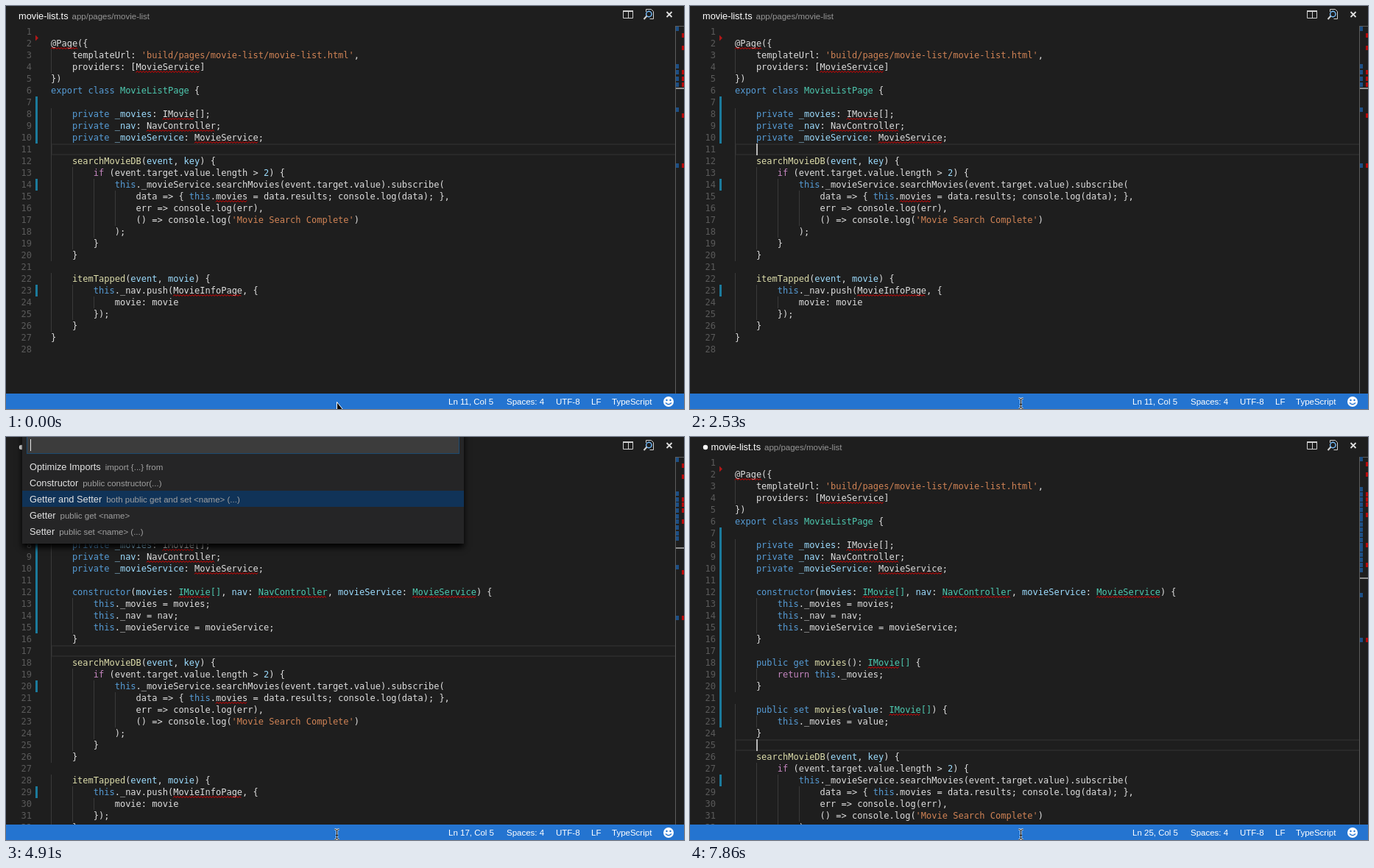
An HTML page with a canvas for the animation above (8 s loop, 921 by 548 pixels).

```html
<!DOCTYPE html>
<html lang="en">
<head>
<meta charset="utf-8">
<title>Code generation in an editor</title>
<style>
html, body { margin: 0; width: 100%; height: 100%; overflow: hidden; background: #1e1e1e; }
canvas { display: block; }
</style>
</head>
<body>
<canvas id="stage" width="921" height="548"></canvas>
<script>
const ctx = document.getElementById('stage').getContext('2d');
const LOOP = 8000, TOP = 27, BOTTOM = 527, LINE = 16, CODE_X = 61, CHAR = 7.224;
const CODE_FONT = '12px "DejaVu Sans Mono", monospace';
const UI_FONT = '12.8px "Liberation Sans", Arial, sans-serif';
const SMALL_FONT = '11.5px "Liberation Sans", Arial, sans-serif';

const head = `
@Page({
    templateUrl: 'build/pages/movie-list/movie-list.html',
    providers: [MovieService]
})
export class MovieListPage {

    private _movies: IMovie[];
    private _nav: NavController;
    private _movieService: MovieService;
    `;
const constructorCode = `
    constructor(movies: IMovie[], nav: NavController, movieService: MovieService) {
        this._movies = movies;
        this._nav = nav;
        this._movieService = movieService;
    }
    `;
const accessorCode = `
    public get movies(): IMovie[] {
        return this._movies;
    }

    public set movies(value: IMovie[]) {
        this._movies = value;
    }
    `;
const tail = `
    searchMovieDB(event, key) {
        if (event.target.value.length > 2) {
            this._movieService.searchMovies(event.target.value).subscribe(
                data => { this.movies = data.results; console.log(data); },
                err => console.log(err),
                () => console.log('Movie Search Complete')
            );
        }
    }

    itemTapped(event, movie) {
        this._nav.push(MovieInfoPage, {
            movie: movie
        });
    }
}
`;

const tokenRule = new RegExp([
  /(?<string>'[^']*')/,
  /(?<keyword>\b(?:export|class|private|public|get|set|constructor|this)\b)/,
  /(?<control>\b(?:if|return)\b)/,
  /(?<type>(?<=class )\w+|(?<=: )[A-Z]\w+(?:\[\])?(?=,|\)| \{))/,
  /(?<method>(?<=^ {4}|[gs]et )\w+(?=\())/,
  /(?<variable>(?<=private )\w+|(?<=^ {4}[\w ]+\(.*)\b\w+(?=[:,)]))/
].map(r => r.source).join('|'), 'g');
const colors = {
  string: '#d08355', keyword: '#569cd6', control: '#c586c0',
  type: '#4ec9b0', method: '#dcdcaa', variable: '#9cdcfe'
};

function makeDoc(text, cursor, lastChanged, errorRule) {
  const lines = text.split('\n');
  const changed = [cursor + 3, cursor + 12];
  for (let n = 7; n <= lastChanged; n++) changed.push(n);
  return { lines, cursor, changed, errors: lines.map(line => [...line.matchAll(errorRule)]) };
}
const errorNames = '@Page|\\b(?:IMovie|NavController|MovieService|MovieInfoPage)\\b';
const allErrors = new RegExp(errorNames + '|(?<=this\\.)movies', 'g');
const docs = [
  makeDoc(head + tail, 11, 10, allErrors),
  makeDoc(head + constructorCode + tail, 17, 15, allErrors),
  makeDoc(head + constructorCode + accessorCode + tail, 25, 23, new RegExp(errorNames, 'g'))
];

const actions = { row: 22, items: [
  ['Optimize Imports', 'import {...} from'],
  ['Constructor', 'public constructor(...)'],
  ['Getter and Setter', 'both public get and set <name> (...)'],
  ['Getter', 'public get <name>'],
  ['Setter', 'public set <name> (...)']
] };
const fields = { row: 44, items: [
  ['_movies', 'MovieListPage', 'IMovie[]'],
  ['_nav', 'MovieListPage', 'NavController'],
  ['_movieService', 'MovieListPage', 'MovieService']
] };

// Each step changes part of the state from its time on.
const steps = [
  [0, { doc: 0, ruler: 0, menu: null, selected: 0, caret: false, arrow: true }],
  [450, { caret: true }],
  [890, { menu: actions, arrow: false }],
  [1490, { caret: false }],
  [1790, { selected: 1, caret: true }],
  [2230, { caret: false }],
  [2530, { menu: null, caret: true }],
  [2680, { doc: 1 }],
  [2970, { caret: false }],
  [3260, { ruler: 1 }],
  [3560, { caret: true }],
  [3710, { menu: actions, selected: 0 }],
  [4310, { caret: false }],
  [4460, { selected: 1, caret: true }],
  [4910, { selected: 2 }],
  [5500, { caret: false }],
  [5650, { menu: fields, selected: 0, caret: true }],
  [6100, { caret: false }],
  [6540, { caret: true }],
  [6690, { menu: null }],
  [6830, { doc: 2 }],
  [7270, { caret: false }],
  [7560, { ruler: 2 }],
  [7860, { caret: true }]
];
const stateAt = time => Object.assign({}, ...steps.filter(s => s[0] <= time).map(s => s[1]));

function rect(x, y, w, h, color) {
  ctx.fillStyle = color;
  ctx.fillRect(x, y, w, h);
}
function text(str, x, y, color, font) {
  ctx.font = font;
  ctx.fillStyle = color;
  ctx.fillText(str, x, y);
  return x + ctx.measureText(str).width;
}
function shape(path, { fill, stroke, width = 1 }) {
  const p = new Path2D(path);
  ctx.lineWidth = width;
  if (fill) { ctx.fillStyle = fill; ctx.fill(p); }
  if (stroke) { ctx.strokeStyle = stroke; ctx.stroke(p); }
}
function dot(x, y, r, color) {
  ctx.fillStyle = color;
  ctx.beginPath();
  ctx.arc(x, y, r, 0, Math.PI * 2);
  ctx.fill();
}
const lineTop = n => TOP + (n - 1) * LINE;

function drawTitle(dirty) {
  if (dirty) dot(21, 14, 3.2, '#fff');
  const end = text('movie-list.ts', dirty ? 28.5 : 17, 18, '#fff', UI_FONT);
  text('app/pages/movie-list', end + 5, 18, '#969696', SMALL_FONT);

  const gray = '#d0d0d0';
  shape('M838.5 6.5h13v10h-13zM845.5 7v9', { stroke: gray });
  rect(838, 6, 14, 2, gray);
  shape('M869.5 8V4.5h7l3 3v10h-5', { stroke: gray });
  shape('M877 11a3.7 3.7 0 1 1-7.4 0a3.7 3.7 0 1 1 7.4 0', { stroke: '#75beff', width: 1.4 });
  shape('M870.5 13.5l-4 4.5', { stroke: gray, width: 2 });
  shape('M897.5 8l7 7m0-7l-7 7', { stroke: '#e0e0e0', width: 1.8 });
}

function drawSquiggle(x, y, width) {
  let path = `M${x} ${y + 15.5}`;
  for (let i = 2; i <= width; i += 2) path += `L${x + i} ${y + (i % 4 ? 13.5 : 15.5)}`;
  shape(path, { stroke: '#f00000' });
}

function drawLine(line, n, errors) {
  const y = lineTop(n), base = y + 12;
  ctx.textAlign = 'right';
  text(n, 35, base, '#5a5a5a', CODE_FONT);
  ctx.textAlign = 'left';
  const indent = line.match(/^ */)[0].length;
  for (let col = 0; col < indent; col += 4) {
    rect(Math.round(CODE_X + col * CHAR), y, 1, LINE, '#3a3a3a');
  }
  const put = (str, col, color) => text(str, CODE_X + col * CHAR, base, color, CODE_FONT);
  let col = 0;
  for (const m of line.matchAll(tokenRule)) {
    put(line.slice(col, m.index), col, '#dedede');
    const kind = Object.keys(colors).find(k => m.groups[k]);
    put(m[0], m.index, colors[kind]);
    col = m.index + m[0].length;
  }
  put(line.slice(col), col, '#dedede');
  for (const m of errors) drawSquiggle(CODE_X + m.index * CHAR, y, m[0].length * CHAR);
}

function drawEditor(doc, caret) {
  const y = lineTop(doc.cursor);
  ctx.strokeStyle = '#292929';
  ctx.lineWidth = 2;
  ctx.strokeRect(62, y + 1, 870, LINE - 2);
  for (const n of doc.changed) rect(40, lineTop(n), 3, LINE, '#1b7a9c');
  shape('M40 39.5l4 4l-4 4z', { fill: '#b01818' });
  doc.lines.forEach((line, i) => {
    if (lineTop(i + 1) < BOTTOM) drawLine(line, i + 1, doc.errors[i]);
  });
  if (caret) rect(90, y, 2, LINE, '#b8b8b8');
}

function drawRuler(doc) {
  const step = (BOTTOM - TOP) / (doc.lines.length + 31.2);
  const center = n => Math.round(TOP + (n - 0.5) * step);
  rect(909, TOP, 12, BOTTOM - TOP, '#1e1e1e');
  rect(909, TOP, 1, BOTTOM - TOP, '#5c5c5c');
  rect(909, TOP, 12, 1, '#5c5c5c');
  for (const n of [1, ...doc.changed]) rect(910, center(n) - 3, 4, 6, '#1c4f86');
  doc.errors.forEach((e, i) => {
    if (e.length) rect(918, center(i + 1) - 3, 3, 6, '#b80a0a');
  });
  rect(910, Math.round(TOP + (doc.cursor - 1) * step), 11, 2, '#909090');
}

function drawStatus(doc) {
  rect(0, BOTTOM, 921, 21, '#2474d0');
  const labels = [[`Ln ${doc.cursor}, Col 5`, 601], ['Spaces: 4', 680], ['UTF-8', 747], ['LF', 795], ['TypeScript', 823]];
  for (const [label, x] of labels) text(label, x, 542, '#fff', SMALL_FONT);
  dot(900, 538, 7, '#fff');
  dot(897.5, 536, 1.2, '#2474d0');
  dot(902.5, 536, 1.2, '#2474d0');
  shape('M896 539.5q4 4.5 8 0', { stroke: '#2474d0', width: 1.3 });
}

function drawMenu({ row, items }, selected, caret) {
  ctx.save();
  ctx.shadowColor = '#000';
  ctx.shadowBlur = 8;
  ctx.shadowOffsetY = 5;
  rect(22, -10, 600, 45 + row * items.length, '#252526');
  ctx.restore();
  rect(28, -1, 588, 24, '#1c4a70');
  rect(29, -1, 586, 23, '#3c3c3c');
  if (caret) rect(33, 3, 1, 16, '#e8e8e8');
  items.forEach(([label, note, detail], i) => {
    const y = 29 + i * row;
    if (i === selected) rect(22, y, 600, row, '#103358');
    const end = text(label, 32, y + 16, '#e4e4e4', UI_FONT);
    text(note, end + 6, y + 16, '#a0a0a0', SMALL_FONT);
    if (detail) text(detail, 32, y + 36, '#a0a0a0', UI_FONT);
  });
}

function drawPointer(arrow) {
  if (arrow) {
    shape('M449.5 538.5v13l3-3h5z', { fill: '#000', stroke: '#fff' });
  } else {
    const beam = 'M446.5 533.5q3 0 3 2.5q0-2.5 3-2.5M449.5 536v9M446.5 547.5q3 0 3-2.5q0 2.5 3 2.5M448 541.5h3';
    shape(beam, { stroke: '#fff', width: 2.4 });
    shape(beam, { stroke: '#000' });
  }
}

function draw(now) {
  const s = stateAt(now % LOOP), doc = docs[s.doc];
  rect(0, 0, 921, 548, '#1e1e1e');
  drawTitle(s.doc > 0);
  drawEditor(doc, s.caret && !s.menu);
  drawRuler(docs[s.ruler]);
  drawStatus(doc);
  if (s.menu) drawMenu(s.menu, s.selected, s.caret);
  drawPointer(s.arrow);
  requestAnimationFrame(draw);
}
requestAnimationFrame(draw);
</script>
</body>
</html>
```
